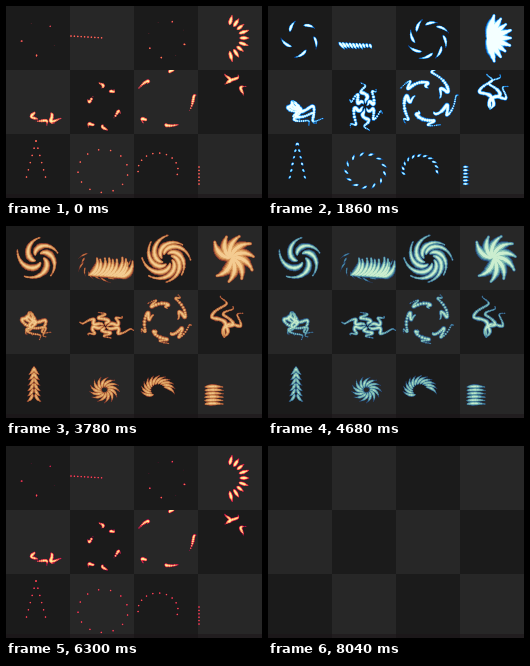
An HTML page with a canvas that plays this animation: 256 px wide and 192 px high, repeating every 8.1 s.

```html
<!DOCTYPE html>
<html>
<head>
<meta charset="utf-8">
<style>
html, body { margin: 0; width: 100%; height: 100%; overflow: hidden; background: #1b1b1b; }
canvas { display: block; width: 256px; height: 192px; }
</style>
</head>
<body>
<canvas id="stage" width="256" height="192"></canvas>
<script>
const ctx = document.getElementById('stage').getContext('2d');
const STEP = 60, PHASES = 15, CELL = 64, RAD = Math.PI / 180;

// Each palette runs from the outline to the core.
const palettes = [
  ['#b83048', '#f0505a', '#ff9a48', '#fff0b0'],
  ['#8a2a20', '#e8642a', '#ffb640', '#fff2a8'],
  ['#0b4fb4', '#2aa0f0', '#a4ecff', '#f4ffff'],
  ['#0c5a48', '#37a84c', '#94de4c', '#c0f060'],
  ['#8a3c30', '#c07844', '#dea466', '#f4cc92'],
  ['#2a4a78', '#4a88a0', '#86c0b4', '#cceed0'],
  ['#543a80', '#94607e', '#bc8880', '#d4a890'],
  ['#9c1048', '#ee2c50', '#ff8448', '#ffeca0'],
  ['#4a2a5c', '#a04a80', '#e08a9c', '#ffd8c8']
];

const mix = (a, b, k) => a + (b - a) * k;
const rise = (p, from, to) => Math.min(1, Math.max(0, (p - from) / (to - from)));
const random = seed => {
  const s = Math.sin(seed * 12.9898) * 43758.5453;
  return s - Math.floor(s);
};

// Tapered spiral arms around a pivot; dx and dy shift the pivot from arm to arm.
function arms({ x, y, dx = 0, dy = 0, count, start, sweep = 0, tip, root = 0, twist = 0,
  width, squash = 1, slope = 0, wobble = 0, jitter = 0, from = 0, to = 1 }) {
  const dots = [];
  for (let i = 0; i < count; i++) {
    const along = i / (sweep === 360 ? count : count - 1);
    const reach = tip * (1 + slope * (along - 0.5) + jitter * (random(i + x) - 0.5));
    const length = Math.hypot(reach - root, twist * RAD * (reach + root) / 2) * (to - from);
    const steps = Math.ceil(length * 1.4);
    for (let j = 0; j <= steps; j++) {
      const v = steps ? j / steps : 0.5, u = mix(from, to, v);
      const r = mix(reach, root, u);
      const bend = wobble * Math.sin(u * 11 + i * 2) * Math.sin(Math.PI * u);
      const a = (start + sweep * along + twist * u + bend) * RAD;
      const taper = 0.3 + 0.7 * Math.sin(Math.PI * Math.pow(v, 1.4));
      const grain = 0.85 + 0.3 * random(i * 31 + j);
      dots.push([x + dx * i + r * Math.cos(a), y + dy * i + r * Math.sin(a) * squash,
        width * (steps ? taper * grain : 1)]);
    }
  }
  return dots;
}

// Shared pacing: unfold, die away, and a second burst near the end.
const open = p => rise(p, 0, 3);
const first = p => 1 - rise(p, 4, 8);
const second = p => Math.min(rise(p, 4, 9), 1 - rise(p, 10, 14));
const pull = p => p < 3 ? open(p) : 1 - rise(p, 3, 10);

const swirl = (x, y, count, size) => p => arms({
  x, y, count, start: -118 + 10 * p, sweep: 360,
  tip: size * (1.05 + 0.25 * open(p)), root: size * (1.05 - 0.75 * open(p)),
  twist: -125 * open(p), jitter: 0.25, width: mix(0.85, 3.1, open(p)) * first(p)
});

const wave = p => arms({
  x: 65 + 18 * open(p), y: 30 + 19 * open(p) - 2 * Math.max(0, p - 3), dx: 3.4, dy: 0.2,
  count: 10, start: mix(50, -65, rise(p, 1, 3)), sweep: 15,
  tip: 20 * open(p), twist: 50 * rise(p, 1, 3), slope: -0.7 * (1 - rise(p, 1, 3)),
  jitter: 0.3, width: mix(0.85, 3.6, open(p)) * (1 - rise(p, 3, 11))
});
const wake = p => arms({
  x: 100, y: 36, count: 12, start: -10, sweep: 200, tip: 27, root: 22, twist: 25,
  squash: 0.7, jitter: 0.3, width: 0.8 * Math.min(rise(p, 1, 3), 1 - rise(p, 4, 12))
});

const fan = p => arms({
  x: 220 - 2.2 * Math.max(0, p - 4) + 5 * rise(p, 1, 3), y: 32, count: 9,
  start: mix(-75, -165, rise(p, 1, 4)), sweep: mix(150, 320, rise(p, 1, 4)),
  tip: mix(23, 11, rise(p, 3, 10)), root: p < 3 ? 14 * (1 - rise(p, 0, 1)) : 10 * rise(p, 3, 10),
  twist: -45 * rise(p, 1, 3) * first(p), jitter: 0.15,
  width: (mix(2, 5, rise(p, 0, 1)) - 4 * rise(p, 3, 9)) * (1 - rise(p, 10, 13))
});

// Lightning runs from the tips to the roots, then its tail catches up.
const bolt = pose => p => arms({
  wobble: 22, jitter: 0.3, ...pose(rise(p, 1, 3), rise(p, 3, 10)),
  from: 0.97 * rise(p, 3, 10), to: mix(0.28, 1, rise(p, 0, 1)),
  width: (mix(1.8, 2.3, rise(p, 0, 1)) - 1.4 * rise(p, 3, 9)) * (1 - rise(p, 10, 13))
});

const feather = side => p => arms({
  x: 30 - 2 * open(p), y: 135 + 6 * open(p), dx: side * (1.9 - 1.6 * open(p)),
  dy: 7.2 - 1.8 * open(p), count: 6, start: 90 - side * 35, tip: 9 * open(p),
  twist: side * 30 * open(p), width: mix(0.85, 1.8, open(p)) * first(p)
});
const grass = p => arms({
  x: 8, y: 183, dx: 5.7, count: 9, start: -125, sweep: 70,
  tip: 8 * second(p), twist: 10, width: 1.7 * second(p)
});

const wheel = p => {
  const tip = 25 - 10 * pull(p);
  return arms({
    x: 97 + 0.5 * p, y: 165 - 0.4 * p, count: 13, start: -100 + 8 * p, sweep: 360, tip,
    root: tip - 12 * pull(p) - 6 * rise(p, 3, 10), twist: -50 * pull(p), squash: 0.86,
    width: mix(0.85, 1.7, open(p)) * (1 - rise(p, 9, 14))
  });
};

const crescent = p => arms({
  x: 152, y: 164, count: 11, start: -185, sweep: 200, tip: 20 - 3 * open(p),
  root: 20 - 13 * open(p), twist: -45 * open(p), squash: 0.85,
  width: mix(0.85, 1.7, open(p)) * first(p)
});
const comet = p => arms({
  x: 155, y: 170, count: 10, start: 110, sweep: -110, tip: 22, root: 17,
  twist: 20, squash: 0.6, width: 1.8 * second(p)
});

const comb = p => arms({
  x: 193 + 6 * open(p), y: 161, dy: 3.4, count: 6, start: 0,
  tip: 18 * open(p), twist: -8, width: mix(0.85, 2.1, open(p)) * first(p)
});
const hoop = p => arms({
  x: 237, y: 170, count: 11, start: -115, sweep: 240, tip: 17, root: 12,
  twist: -25, squash: 0.6, width: 1.6 * second(p)
});

const cells = [
  [swirl(33, 32, 5, 16)],
  [wake, wave],
  [swirl(161, 33, 8, 18)],
  [fan],
  [bolt(late => ({ x: 24, y: 93 - 9 * late, count: 5, start: 32 + 15 * late, sweep: 50,
    tip: 31, root: 2, twist: 20, slope: -0.6 + 0.4 * late }))],
  [bolt((late, end) => ({ x: 97 + 2 * late, y: 100, count: 6, start: -105, sweep: 360,
    tip: 18 + 8 * late, root: 2 + 24 * end, twist: 30, squash: 1.5 - 0.95 * late }))],
  [bolt((late, end) => ({ x: 159, y: 95, count: 5, start: -155 + 20 * late, sweep: 360,
    tip: 31 - 5 * late, root: 13 + 10 * end, twist: 70 - 15 * late }))],
  [bolt(late => ({ x: 222 - 4 * late, y: 104 + 8 * late, count: 3, start: -95, sweep: 42,
    tip: 34, root: 1, twist: -8, slope: -0.25 }))],
  [feather(-1), feather(1), grass],
  [wheel],
  [crescent, comet],
  [comb, hoop]
];

// Wider cores make the opening flash read brighter than the later smoke.
function paint(dots, palette, heat) {
  palette.forEach((color, layer) => {
    const scale = 1 - layer * mix(0.22, 0.15, heat);
    ctx.fillStyle = color;
    for (const [x, y, width] of dots) {
      const r = width * scale - layer * 0.05;
      if (r < (layer ? 0.45 : 0.08)) continue;
      ctx.beginPath();
      ctx.arc(x, y, r, 0, 2 * Math.PI);
      ctx.fill();
    }
  });
}

function draw(time) {
  const tick = Math.floor(time / STEP) % (PHASES * palettes.length);
  const phase = tick % PHASES, palette = palettes[Math.floor(tick / PHASES)];
  cells.forEach((effects, i) => {
    const col = i % 4, row = Math.floor(i / 4);
    ctx.save();
    ctx.beginPath();
    ctx.rect(col * CELL, row * CELL, CELL, CELL);
    ctx.clip();
    ctx.fillStyle = (col + row) % 2 ? '#272727' : '#1b1b1b';
    ctx.fillRect(col * CELL, row * CELL, CELL, CELL);
    paint(effects.flatMap(effect => effect(phase)), palette, 1 - rise(phase, 1, 3));
    ctx.restore();
  });
  ctx.fillStyle = 'rgba(28, 20, 24, 0.5)';
  ctx.fillRect(0, 188, 256, 4);
}

const began = performance.now();
function loop() {
  draw(performance.now() - began);
  requestAnimationFrame(loop);
}
loop();
</script>
</body>
</html>
```
